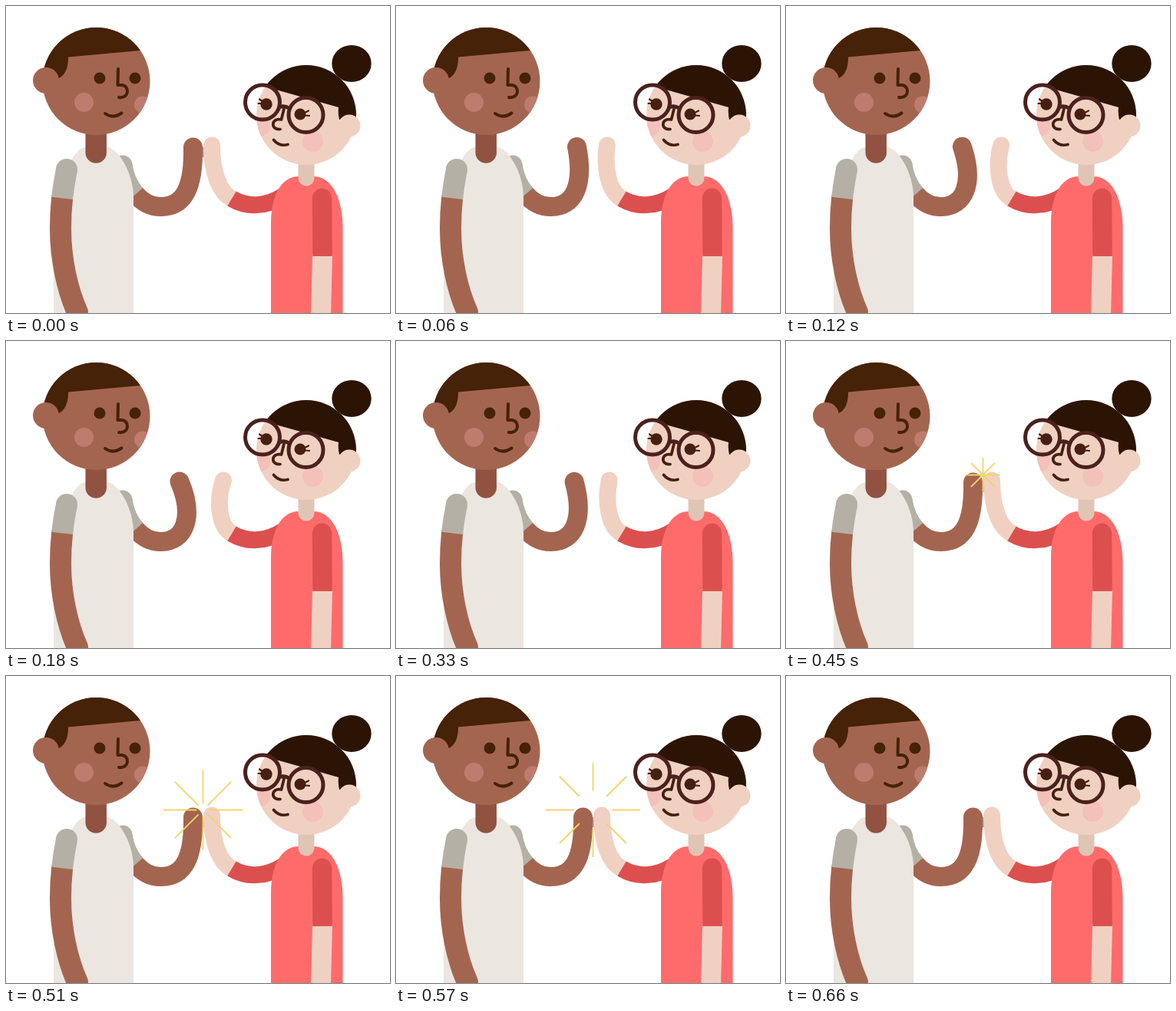
Animation of 500x400 px, one loop 0.75 s. Source, as an HTML page:

```html
<!DOCTYPE html>
<html lang="en">
<head>
<meta charset="utf-8">
<title>High five</title>
<style>
  html, body { margin: 0; width: 100%; height: 100%; overflow: hidden; background: #fff; }
  svg { display: block; width: 100vw; height: 100vh; }
  .line { fill: none; stroke-linecap: round; stroke-linejoin: round; }
  .butt { fill: none; stroke-linecap: butt; }
</style>
</head>
<body>
<svg viewBox="0 0 500 400">
  <defs>
    <clipPath id="headA"><circle cx="117.5" cy="98" r="70"/></clipPath>
    <clipPath id="headB"><circle cx="391" cy="142" r="65"/></clipPath>
  </defs>

  <rect id="gap" x="256" y="184" width="2.4" height="13" fill="#9c9c92"/>

  <!-- man -->
  <g>
    <path id="armA" class="line" stroke="#a46550" stroke-width="25"/>
    <g fill="#b5b0a5">
      <circle cx="152" cy="207" r="12.5"/>
      <path class="butt" stroke="#b5b0a5" stroke-width="25" d="M152 207C154 221.5 160 235.25 168.8 245.3"/>
    </g>
    <path fill="#ebe6e0" d="M62 400V330C62 240 85 184 104 184H132C144 184 166 215 166 250V400Z"/>
    <path class="line" stroke="#a46550" stroke-width="28" d="M73.1 250.4C71.7 263 71 276 71 290C71 330 80 370 93 399"/>
    <circle cx="79" cy="213" r="14" fill="#b5b0a5"/>
    <path class="butt" stroke="#b5b0a5" stroke-width="28" d="M79 213C76.5 225.5 74.5 237.75 73.1 250.4"/>
    <path class="line" stroke="#915242" stroke-width="27.5" d="M117.2 160V191"/>
    <circle cx="117.5" cy="98" r="70" fill="#a46550"/>
    <g clip-path="url(#headA)">
      <path fill="#452208" d="M175 58L81 66.5C81 85 75 93 62 97H40V20H180Z"/>
      <circle cx="178" cy="128.5" r="11" fill="#be7c6f"/>
    </g>
    <circle cx="52" cy="97" r="17" fill="#a46550"/>
    <circle cx="101.5" cy="125.5" r="12.5" fill="#be7c6f"/>
    <g fill="#452208">
      <circle cx="122" cy="94" r="7.5"/>
      <circle cx="168" cy="94" r="7.5"/>
    </g>
    <path class="line" stroke="#452208" stroke-width="4" d="M146 82L145.5 103H151C161 104 161 121 147 119M129 140Q139 147.5 150.5 139.5"/>
  </g>

  <!-- woman -->
  <g>
    <path id="armB" class="line" stroke="#f0d1c1" stroke-width="22"/>
    <path class="butt" stroke="#db504f" stroke-width="22" d="M294 251C312 262 338 263 362 247"/>
    <path fill="#ff6b6b" d="M345 400V282C345 250 357 222 381 222H400C425 222 438.5 252 438.5 290V400Z"/>
    <path class="butt" stroke="#f0d1c1" stroke-width="26" d="M412 324L410 402"/>
    <circle cx="411.5" cy="250" r="12.5" fill="#db504f"/>
    <path class="butt" stroke="#db504f" stroke-width="25.5" d="M411.5 250L412 326"/>
    <path class="line" stroke="#e0c5b5" stroke-width="21" d="M391 195V224"/>
    <ellipse cx="450" cy="75" rx="25.7" ry="24" fill="#2c1404"/>
    <circle cx="391" cy="142" r="65" fill="#f0d1c1"/>
    <g clip-path="url(#headB)">
      <path fill="#2c1404" d="M330 103L433 132Q432 140 434 148L460 146V70H330Z"/>
      <circle cx="331" cy="157" r="13" fill="#f4c0ba"/>
    </g>
    <circle cx="447" cy="156" r="14.5" fill="#f0d1c1"/>
    <circle cx="399.5" cy="176.5" r="13.5" fill="#f4c0ba"/>
    <g fill="#452010">
      <circle cx="339" cy="128" r="7.7"/>
      <circle cx="383" cy="141" r="7.5"/>
    </g>
    <path class="line" stroke="#452010" stroke-width="2.2" d="M330 121.5L335 125M328.5 127H334M388 139.5L394 136.5M389 142.5L395 143"/>
    <path class="line" stroke="#452010" stroke-width="3.7" d="M362 134L358.5 148C345 145 344 162 357 160.5M348.5 174.5Q356 183.5 367 180.5"/>
    <g class="line" stroke="#4a211d" stroke-width="5">
      <circle cx="334" cy="125.5" r="22.5"/>
      <circle cx="390.5" cy="142" r="22.5"/>
      <path d="M357 131.5Q363 129.5 369 133.5"/>
    </g>
  </g>

  <path id="spark" class="butt" stroke="#f3d468" stroke-width="1.8"/>
</svg>
<script>
  const LOOP = 750, STEP = 30;
  const $ = id => document.getElementById(id);
  const clamp = x => Math.min(1, Math.max(0, x));
  const span = (t, from, to) => clamp((t - from) / (to - from));
  const out = (x, p) => 1 - Math.pow(1 - x, p);

  // 0 = palms touching, 1 = hands apart
  const apart = t => t < 300 ? out(span(t, 0, 180), 1.5) : 1 - out(span(t, 300, 420), 1.5);

  function rays(inner, outer) {
    if (outer - inner < 0.5) return "";
    let d = "";
    for (let i = 0; i < 8; i++) {
      const c = Math.cos(i * Math.PI / 4), s = Math.sin(i * Math.PI / 4);
      const at = r => (256.5 + r * c).toFixed(2) + " " + (174.5 + r * s).toFixed(2);
      d += "M" + at(inner) + "L" + at(outer);
    }
    return d;
  }

  function draw(t) {
    const a = apart(t);
    const mix = (from, to) => (from + (to - from) * a).toFixed(2);
    $("armA").setAttribute("d",
      `M168.8 245.3C177.6 255.5 189 261.75 202 261.5C232 261.5 ${mix(244.5, 246)} ${mix(236, 230)} ${mix(243.5, 226)} ${mix(184, 183)}`);
    $("armB").setAttribute("d",
      `M${mix(268, 283)} 181.5C${mix(268, 274)} ${mix(215, 208)} 277 242 294 251`);
    $("gap").style.display = a ? "none" : "";
    const outer = 61.5 * out(span(t, 420, 570), 2);
    const inner = 61.5 * Math.pow(span(t, 450, 660), 1.6);
    $("spark").setAttribute("d", rays(inner, outer));
  }

  function tick() {
    const t = performance.now() % LOOP;
    draw(Math.floor(t / STEP) * STEP);
    requestAnimationFrame(tick);
  }
  tick();
</script>
</body>
</html>
```
